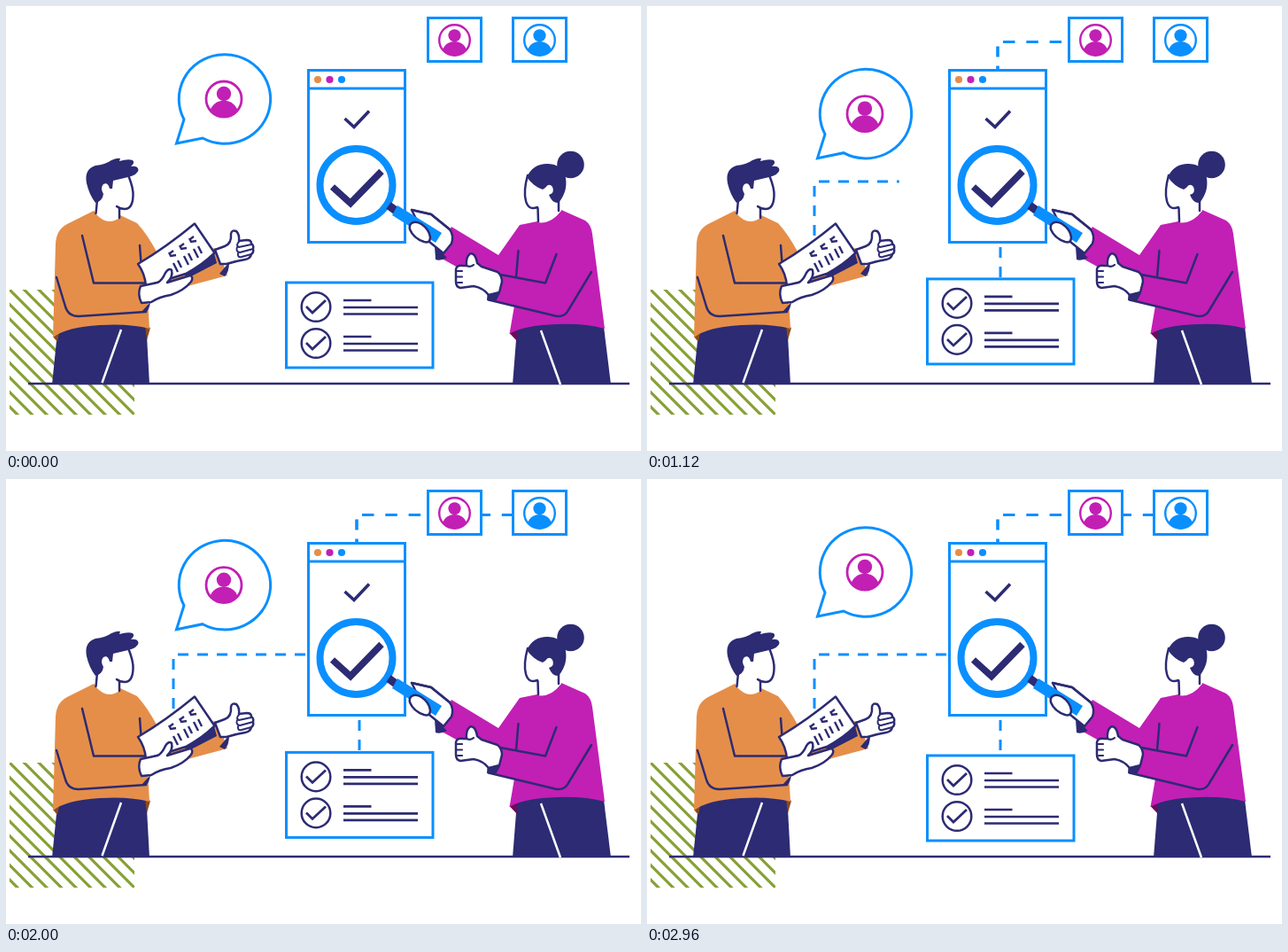
These frames come from a looping animation (717x502 px, 3 s). An HTML page with a canvas:

```html
<!DOCTYPE html>
<html lang="en">
<head>
<meta charset="utf-8">
<title>Profile check</title>
<style>
html, body { margin: 0; width: 100%; height: 100%; overflow: hidden; background: #fff; }
canvas { display: block; }
</style>
</head>
<body>
<canvas id="stage" width="717" height="502"></canvas>
<script>
const ctx = document.getElementById('stage').getContext('2d');
const LOOP = 3000, STEP = 40, DRAW = 1500;
const NAVY = '#2c2b73', BLUE = '#0a8fff', PINK = '#c21fb5', ORANGE = '#e58e4a';
const GREEN = '#87a136', WHITE = '#fff';

const paths = new Map();
function path(d) {
  if (!paths.has(d)) paths.set(d, new Path2D(d));
  return paths.get(d);
}
function fill(d, color) {
  ctx.fillStyle = color;
  ctx.fill(path(d));
}
function line(d, color = NAVY, width = 2.5, join = 'round', cap = 'round') {
  ctx.strokeStyle = color;
  ctx.lineWidth = width;
  ctx.lineJoin = join;
  ctx.lineCap = cap;
  ctx.stroke(path(d));
}
function outlined(d, color = WHITE, width = 2.5) {
  fill(d, color);
  line(d, NAVY, width);
}
function tick(d, width) {
  line(d, NAVY, width, 'miter', 'butt');
}
function disc(x, y, r, color) {
  ctx.fillStyle = color;
  ctx.beginPath();
  ctx.arc(x, y, r, 0, Math.PI * 2);
  ctx.fill();
}
function ring(x, y, r, color, width) {
  disc(x, y, r, WHITE);
  ctx.strokeStyle = color;
  ctx.lineWidth = width;
  ctx.stroke();
}
function panel(x, y, w, h) {
  ctx.fillStyle = WHITE;
  ctx.fillRect(x, y, w, h);
  ctx.strokeStyle = BLUE;
  ctx.lineWidth = 3;
  ctx.lineJoin = 'miter';
  ctx.strokeRect(x, y, w, h);
}

function avatar(x, y, scale, color) {
  ctx.save();
  ctx.translate(x, y);
  ctx.scale(scale, scale);
  ring(0, 0, 20, color, 2.8);
  disc(0, -6, 8.2, color);
  ctx.beginPath();
  ctx.arc(0, 0, 20, 0, Math.PI * 2);
  ctx.clip();
  ctx.beginPath();
  ctx.ellipse(0, 16, 15.8, 14.3, 0, 0, Math.PI * 2);
  ctx.fill();
  ctx.restore();
}

// Dashed polyline, shown only up to the given length
function dashes(points, shown, dash, gap, width = 3) {
  ctx.strokeStyle = BLUE;
  ctx.lineWidth = width;
  ctx.lineCap = 'butt';
  ctx.lineJoin = 'miter';
  ctx.setLineDash([dash, gap]);
  let left = shown;
  ctx.beginPath();
  ctx.moveTo(...points[0]);
  for (let i = 1; i < points.length && left > 0; i++) {
    const [ax, ay] = points[i - 1], [bx, by] = points[i];
    const len = Math.hypot(bx - ax, by - ay);
    const k = Math.min(1, left / len);
    ctx.lineTo(ax + (bx - ax) * k, ay + (by - ay) * k);
    left -= len;
  }
  if (shown > 0) ctx.stroke();
  ctx.setLineDash([]);
}

function links(t) {
  const p = Math.min(1, t / DRAW);
  dashes([[189, 259], [189, 198], [338, 198]], 210 * p, 12, 10);
  const top = 249 * p;
  dashes([[396, 101.5], [396, 40.5]], Math.min(top, 61), 12, 10, 3.6);
  dashes([[402, 40.5], [573, 40.5]], top - 80, 13.5, 12.8);
  dashes([[399, 306], [399, 272]], 34 * Math.min(1, t / 1000), 12, 10);
}

function stripes() {
  const gap = 16.5, size = 141;
  ctx.save();
  ctx.beginPath();
  ctx.rect(4, 320, size, size);
  ctx.clip();
  ctx.strokeStyle = GREEN;
  ctx.lineWidth = 3.2;
  ctx.beginPath();
  for (let i = -9; i < 9; i++) {
    ctx.moveTo(i * gap, 316);
    ctx.lineTo(i * gap + 150, 466);
  }
  ctx.stroke();
  ctx.restore();
}

function man() {
  // trousers
  fill('M58 368L52 427H162L158 354L106 350Z', NAVY);
  line('M130 365L108.5 425', WHITE, 2.5, 'miter', 'butt');
  fill('M53 373L60 369L58 379Z', '#8a4a1c');
  fill('M157 360L163 363L159 377Z', '#8a4a1c');
  // sweater and raised arm
  fill('M99 231L69 246Q57 252 56 268L53 374Q68 362 106 360Q140 358 162 364L160 330L209 315L250 304L239 273L171 279Q160 258 148 245L129 236Q114 248 99 231Z', ORANGE);
  fill('M241 302L252 289Q252 300 247 305Z', NAVY);
  line('M86 259L99 312.5H156M151 270L152.5 290M57 306L67 339Q70 350 82 350L158 345');
  fill('M153 345L163 334Q162 342 158 346Z', NAVY);
  // neck and face
  fill('M102 215L101 234Q114 249 128 239L128 226Z', WHITE);
  fill('M104 200L138 191Q144 206 144 213Q144 229 134 229L115 224L103 220Z', WHITE);
  line('M138.5 192Q144 206 143.5 214Q143 229 134 229Q129 229 125 226M128 228V239M103 219L101.5 234');
  fill('M101 222Q94 213 91 200Q88 184 101 180Q112 179 119 174Q126 171 129 172L128 175Q138 172 143 174Q146 177 141 181Q149 180 149.5 185Q149 190 138 193L121 197L120 206H117Q115 198 110 201Q106 205 110 212Q109 220 101 222Z', NAVY);
  // thumb-up hand
  outlined('M236 275L247 271Q255 268 254 257Q255 252 260 254Q264 258 263 265L272 264Q277 264 277 268Q280 270 279 274Q280 278 277 280Q276 285 270 286Q258 288 249 291L242 291Z');
  line('M263 266Q259 270 263 272L277 269M261 272Q259 277 264 278L279 274M262 279Q261 284 266 283L277 280', NAVY, 2);
  // sheets
  fill('M235 279L238 290L209 305L198 303Z', NAVY);
  outlined('M149 291Q181 272 213 245.5L235.5 278.5Q222 292 203 302L158 316Q157 302 149 291Z');
  for (const [x, y] of [[184, 279], [196, 271], [207, 263]]) {
    ctx.save();
    ctx.translate(x, y);
    line('M0 -1L2 3L8 2M1 0L5 -3', NAVY, 2.3, 'miter', 'butt');
    line('M5 11L10 21M10 8L14 16', NAVY, 2.4, 'miter', 'butt');
    ctx.restore();
  }
  // holding hand
  outlined('M152 316L171 312Q176 310 180 301Q184 295 187 298Q189 305 182 312L208 304Q212 306 209 311Q201 321 186 326Q173 328 164 334L153 335Q148 325 152 316Z');
}

function woman() {
  // trousers
  fill('M577 364L572 427H683L674 354L622 350Z', NAVY);
  line('M604 366L626 427', WHITE, 2.5, 'miter', 'butt');
  fill('M568.5 369L577 364V378Z', '#6a0c5c');
  // sweater and both arms
  fill('M600 243L580 247L556 281L503 249L485 281L512 296L558 303L545 331L574 338L568.5 370Q585 360 622 359Q655 358 676 364L662 257Q661 247 654 242L627 230Q616 247 600 243Z', PINK);
  line('M578.5 276L576 306M558 303L609 312.5L621.5 280M661 300L635 343Q631 351 622 350L545 331.5');
  fill('M484 271L498 284Q490 288 485 286Z', NAVY);
  fill('M544 318L558 324L553 333L543 332Z', NAVY);
  // neck and face
  fill('M600 222V244Q614 247 627 231L624 218Z', WHITE);
  fill('M589 190Q585 206 587 219Q589 231 600 228L615 222L625 210V190Z', WHITE);
  line('M589 191Q584 209 587 220Q590 231 600 227M600.5 228L601 243M624 220V231');
  disc(637.5, 179, 15.3, NAVY);
  fill('M588 193Q595 178 611 178Q626 178 631 190Q636 207 624 222Q617 223 613 213Q620 211 617 204Q613 199 609 205L606 207Q596 204 588 193Z', NAVY);
  // thumb-up hand
  outlined('M520 293Q519 283 524 279.5Q530 278 532 290L537 294L555 300Q560 304 560 311L557 323L545 326Q539 318 528 316L513 318Q508 317 508 311V297Q509 292 516 293Z');
  line('M509 299H515M509 305.5H515M510 312H515M520 293Q525 295 528 292', NAVY, 2.2);
}

function browser() {
  panel(341.5, 72.5, 109, 194);
  line('M341 93H451', BLUE, 3, 'miter', 'butt');
  disc(352, 83, 4.1, ORANGE);
  disc(365.5, 83, 4.1, PINK);
  disc(379, 83, 4.1, BLUE);
  tick('M382.5 127L393 136.5L410 118.5', 3.5);
}

function lens() {
  ring(395.5, 202, 41, BLUE, 8);
  tick('M368.5 204L389 222.5L424 186.5', 7.6);
}

function holdLens() {
  outlined('M458 230L480 235L501 252Q506 259 503 268L494 279L478 266L466 246Z');
  line('M432 225L443 233', NAVY, 9, 'miter', 'butt');
  fill('M442 225L492 256L485 267L436 236Z', BLUE);
  outlined('M458 245Q463 242 469 246Q478 252 479 261Q479 268 472 266Q460 262 456 252Q455 247 458 245Z');
  line('M458 230L480 235L501 252');
}

function bubble(dy) {
  ctx.save();
  ctx.translate(0, dy);
  const d = 'M192.5 155L201 128A51.7 50.3 0 1 1 222 149Z';
  fill(d, WHITE);
  line(d, BLUE, 3, 'miter');
  avatar(246, 105, 1, PINK);
  ctx.restore();
}

function checklist(dy) {
  ctx.save();
  ctx.translate(0, dy);
  panel(316.5, 312, 165.5, 96);
  for (const y of [340, 381]) {
    ctx.save();
    ctx.translate(350, y);
    ring(0, -0.5, 16.3, NAVY, 2.5);
    tick('M-11 -1L-4 6L11 -8', 2.8);
    line('M31 -8H62.5M31 0H115M31 7.5H115', NAVY, 2.6, 'miter', 'butt');
    ctx.restore();
  }
  ctx.restore();
}

function card(x, color) {
  panel(x, 13.5, 60, 49);
  avatar(x + 30, 38.5, 0.865, color);
}

function draw(t) {
  ctx.fillStyle = WHITE;
  ctx.fillRect(0, 0, 717, 502);
  const bob = (1 - Math.cos(t / LOOP * Math.PI * 2)) / 2;
  stripes();
  links(t);
  line('M25 426H704', NAVY, 2.5, 'miter', 'butt');
  card(476.5, PINK);
  card(572.5, BLUE);
  browser();
  lens();
  bubble(19.6 * bob);
  checklist(-4.8 * bob);
  man();
  woman();
  holdLens();
}

const start = performance.now();
function frame() {
  const t = (performance.now() - start) % LOOP;
  draw(Math.floor(t / STEP) * STEP);
  requestAnimationFrame(frame);
}
frame();
</script>
</body>
</html>
```
